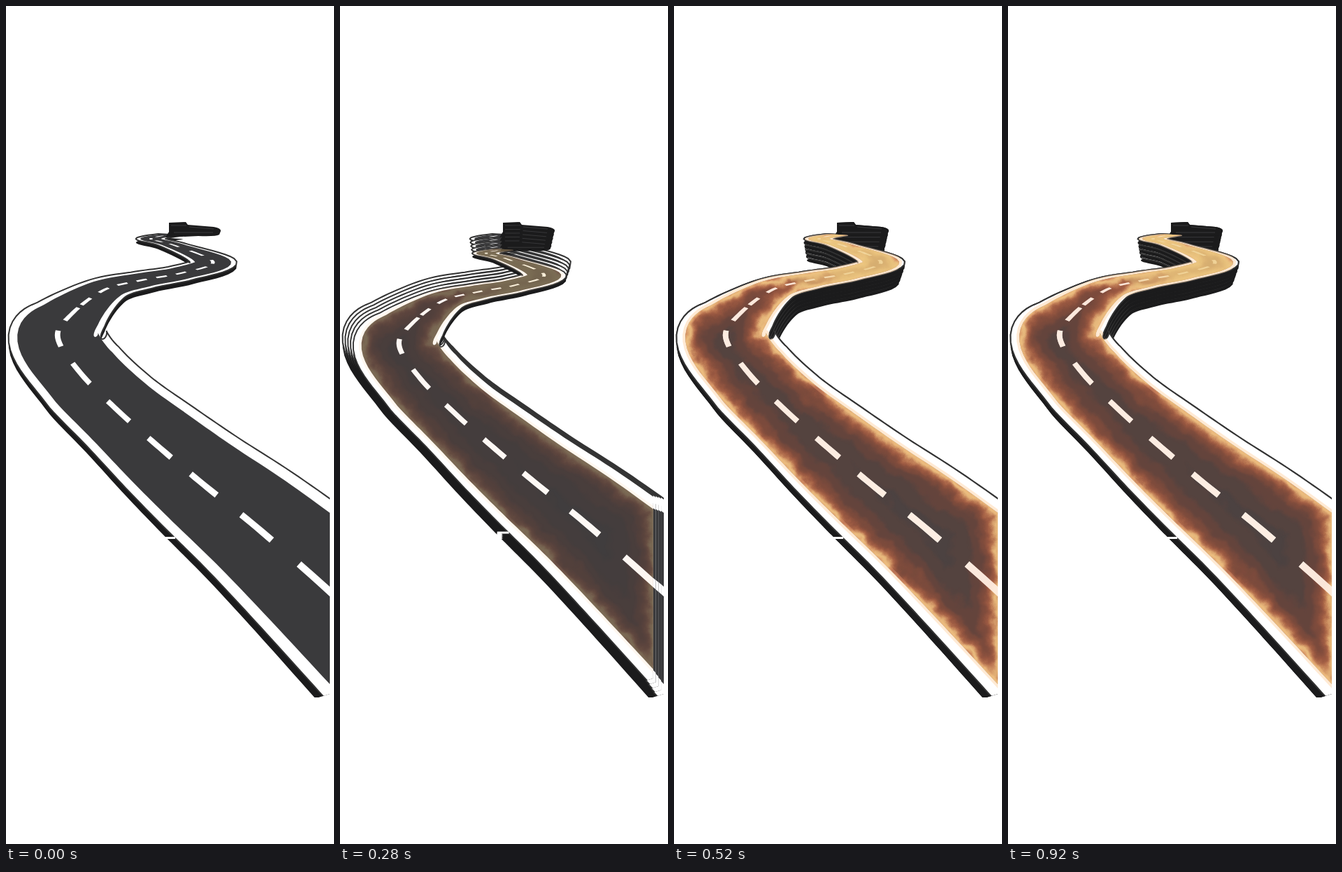
These frames come from a looping animation (469 px wide and 1195 px high, 960 ms). An HTML page:

```html
<!DOCTYPE html>
<html lang="en">
<head>
<meta charset="utf-8">
<title>Glowing road</title>
<style>
html, body { margin: 0; height: 100%; overflow: hidden; background: #fff }
svg { display: block; width: 100vw; height: 100vh }
.block, .wall { fill: #1b1b1c }
</style>
</head>
<body>
<svg viewBox="0 0 469 1195">
<defs>
  <clipPath id="cut"><path d="M0 300H463V981L447 986H0Z"/></clipPath>
  <clipPath id="inOuter"><path class="outer"/></clipPath>
  <clipPath id="inLane"><path class="lane"/></clipPath>
  <filter id="fire" filterUnits="userSpaceOnUse" x="-20" y="290" width="510" height="720" color-interpolation-filters="sRGB">
    <feTurbulence type="fractalNoise" baseFrequency=".03" numOctaves="4" seed="7" result="noise"/>
    <feGaussianBlur in="SourceGraphic" stdDeviation="2.5"/>
    <feDisplacementMap id="warp" in2="noise" xChannelSelector="R" yChannelSelector="G"/>
  </filter>
  <g id="road" clip-path="url(#cut)">
    <path class="outer wall" transform="scale(1 1.016)"/>
    <path class="outer" fill="#fff" stroke="#333" stroke-width="2"/>
    <path stroke="#fff" stroke-width="3" d="M224 758.5H242"/>
    <path class="lane" fill="#3a3a3c"/>
    <path class="dashes" fill="#fff"/>
    <path class="block" d="M233 309L257 308L260 312L297 315Q308 317 307 321L305 326Q300 329 275 328L228 330L233 322Z"/>
    <path stroke="#38383a" d="M236 313H258M262 315L297 318M240 323H296"/>
  </g>
</defs>
<use href="#road"/>
<g id="trail"></g>
<g id="glow">
  <g clip-path="url(#cut)">
    <g clip-path="url(#inOuter)"><path class="lane" fill="none" stroke="#ffdcb8" stroke-width="8" opacity=".6"/></g>
    <g clip-path="url(#inLane)">
      <path class="lane" fill="rgb(150 100 85/.2)"/>
      <g id="flames" filter="url(#fire)" fill="none"></g>
      <path class="dashes" fill="#fff0e4" opacity=".9"/>
      <g filter="url(#fire)" fill="rgb(236 204 130/.5)">
        <path class="haze"/>
        <path class="far haze"/>
      </g>
    </g>
  </g>
</g>
</svg>
<script>
// Centre line from near to far: x, y, half width
const keys = [
  [540, 905, 99], [443, 817, 88], [358, 743, 78], [282, 682, 69],
  [220, 630, 62], [161, 578, 55], [107, 524, 54], [74, 473, 58],
  [93, 440, 45], [140, 405, 30], [194, 391, 25], [250, 381, 24],
  [296, 365, 26], [240, 341, 15], [207, 332, 15], [236, 326, 14]];
const END = keys.length - 1, BEND = 8;
const clamp = (v, lo, hi) => Math.max(lo, Math.min(hi, v));

// Catmull-Rom point [x, y, half width] at u
function at(u) {
  const i = clamp(Math.floor(u), 0, END - 1), t = u - i;
  const [a, b, c, d] = [-1, 0, 1, 2].map(k => keys[clamp(i + k, 0, END)]);
  return b.map((v, j) => v + t / 2 * (c[j] - a[j]
    + t * (2 * a[j] - 5 * v + 4 * c[j] - d[j] + t * (3 * (v - c[j]) + d[j] - a[j]))));
}

// Band around the centre line, flattened towards the horizon
function ribbon(half, from = 0, to = END) {
  const left = [], right = [], n = Math.ceil((to - from) * 10);
  for (let i = 0; i <= n; i++) {
    const u = from + (to - from) * i / n;
    const [x, y, w] = at(u), p = at(u - .01), q = at(u + .01);
    const flat = clamp((y - 300) / 230, .1, 1);
    const nx = (q[1] - p[1]) / flat, ny = p[0] - q[0];
    const k = half(w) / Math.hypot(nx, ny);
    left.push([x + k * nx, y + k * ny * flat]);
    right.unshift([x - k * nx, y - k * ny * flat]);
  }
  return `M${left.join('L')}L${right.join('L')}Z`;
}

const laneHalf = w => w, dashHalf = w => 1.6 + .04 * w;
let dashes = '';
for (let u = 1; u < END; u += u < BEND ? 1 : .5) {
  const len = u <= BEND ? .27 : .13;
  dashes += ribbon(dashHalf, u - len, u + len);
}

// Flames: ever thinner and brighter strokes along the rim
const flames = document.getElementById('flames');
for (let i = 0; i < 7; i++) {
  const colour = `rgb(${150 + 17 * i} ${72 + 4.2 * i * i} ${48 + 2.8 * i * i}/${.12 + .08 * i})`;
  flames.innerHTML += `<path class="rim" stroke="${colour}" stroke-width="${130 * .62 ** i}"/>`;
}

const lane = ribbon(laneHalf);
const shapes = {
  lane, dashes,
  outer: ribbon(w => 4 + 1.15 * w),
  rim: lane + 'M463 722V957',
  haze: ribbon(laneHalf, 9.6),
  far: ribbon(laneHalf, 10.6)
};
for (const name in shapes)
  document.querySelectorAll('.' + name).forEach(p => p.setAttribute('d', shapes[name]));

const LOOP = 960, STEP = 40, FIRST = 3, LOW = 5, REST = 9;
const scale = n => n <= LOW ? 1 - .0165 * n : 1 - .0206 * Math.max(0, REST - n);
const pulse = n => `translate(235 645) scale(${scale(n)}) translate(-235 -645)`;
const [trail, glow, warp] = ['trail', 'glow', 'warp'].map(id => document.getElementById(id));

// Each pose stays on the stage, so the pulse leaves a trail.
for (let n = 1; n <= REST; n++)
  trail.innerHTML += `<use href="#road" transform="${pulse(n)}"/>`;

let shown;
function show(n) {
  [...trail.children].forEach((road, i) => road.style.display = i < n ? '' : 'none');
  glow.style.display = n > 0 ? '' : 'none';
  glow.setAttribute('transform', pulse(n));
  glow.setAttribute('opacity', clamp(n / REST, 0, 1) ** 1.25);
  warp.setAttribute('scale', 22 + 3 * Math.sin(n * .8));
}

const start = performance.now();
function draw() {
  const n = Math.floor((performance.now() - start) % LOOP / STEP) - FIRST;
  if (n !== shown) show(shown = n);
  requestAnimationFrame(draw);
}
draw();
</script>
</body>
</html>
```
